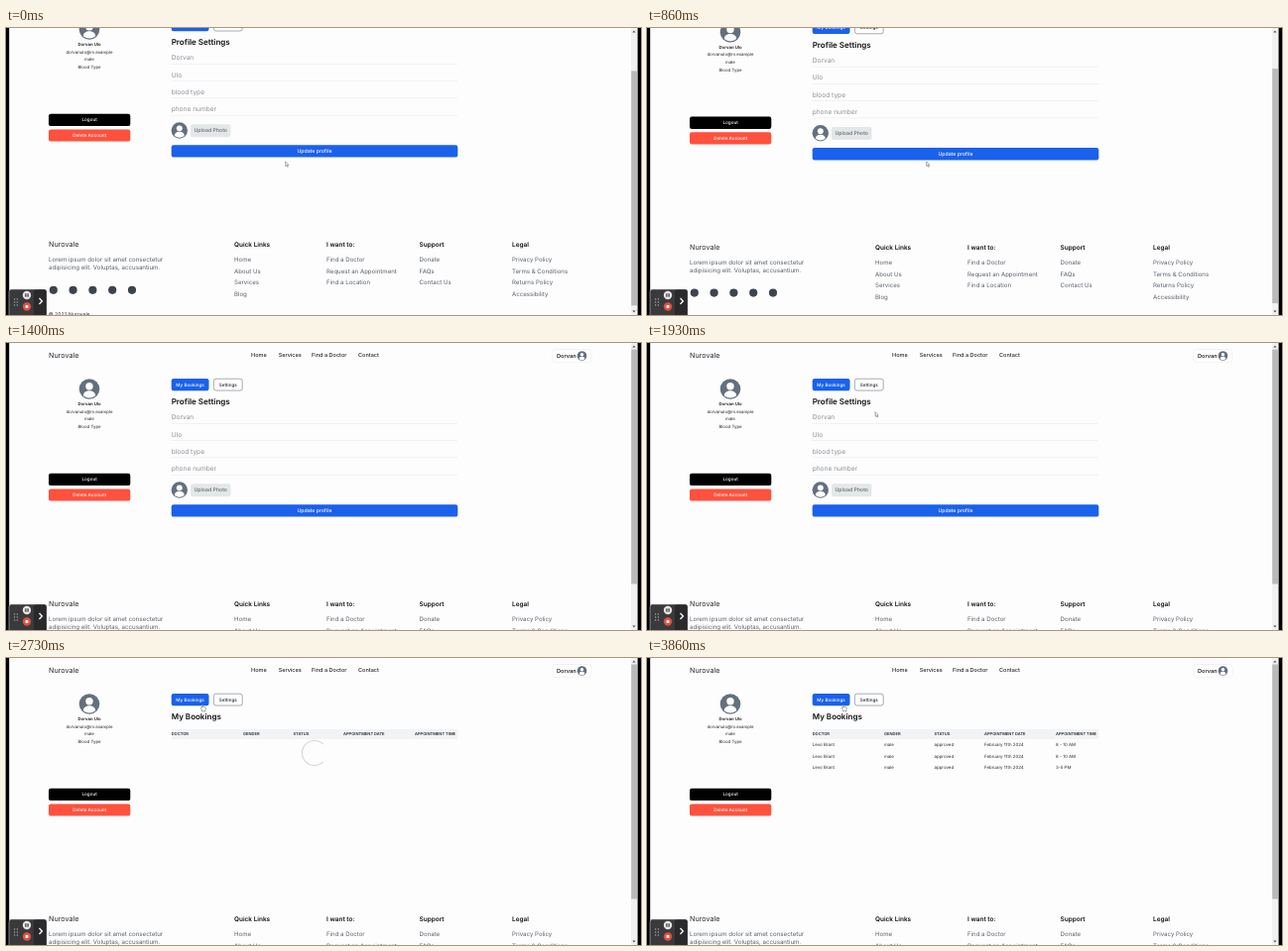
Write an HTML page that moves like this. It is 640 by 290 pixels and loops after 3.93 s.

```html
<!DOCTYPE html>
<html lang="en">
<head>
<meta charset="utf-8">
<title>Patient profile</title>
<style>
  html, body { margin: 0; width: 100%; height: 100%; overflow: hidden; background: #fdfdfd; }
  svg { display: block; width: 640px; height: 290px; }
  text { font-family: Inter, "Open Sans", sans-serif; text-rendering: geometricPrecision; white-space: pre; }
</style>
</head>
<body>
<svg id="stage" viewBox="0 0 640 290"></svg>
<script>
const LOOP = 3930, FRAME = 1000 / 15, MAX_SCROLL = 48;
const BLUE = '#1a61ec', INK = '#24282f', GREY = '#5a616c', FIELD = '#8c9199';

// y is the vertical middle of the capitals
const text = (s, x, y, size, fill = INK, weight = 400, anchor = 'start') =>
  `<text x="${x}" y="${y + size * 0.36}" font-size="${size}" fill="${fill}" font-weight="${weight}" text-anchor="${anchor}">${s}</text>`;
const rect = (x, y, w, h, fill, r = 0, extra = '') =>
  `<rect x="${x}" y="${y}" width="${w}" height="${h}" rx="${r}" fill="${fill}" ${extra}/>`;
const circle = (x, y, r, fill) => `<circle cx="${x}" cy="${y}" r="${r}" fill="${fill}"/>`;
const button = (label, x, y, w, h, size, fill, ink = '#fff', extra = '') =>
  rect(x, y, w, h, fill, 2.2, extra) + text(label, x + w / 2, y + h / 2 - 0.2, size, ink, 500, 'middle');
const avatar = (x, y, r) => `<g transform="translate(${x} ${y}) scale(${r / 10})">
  ${circle(0, 0, 10, '#64707f')}${circle(0, -2.6, 3.6, '#fff')}
  <path d="M-6 6.6C-6 0 6 0 6 6.6Q0 11 -6 6.6Z" fill="#fff"/></g>`;

const header = () =>
  text('Nurovale', 43, 12.3, 7.2) +
  [['Home', 247], ['Services', 274.7], ['Find a Doctor', 308], ['Contact', 355]]
    .map(([s, x]) => text(s, x, 12.2, 5.55, INK, 500)).join('') +
  rect(551, 6.5, 39, 12.8, '#fff', 3, 'stroke="#e9eaec" stroke-width=".6"') +
  text('Dorvan', 555, 12.8, 5.6, INK, 600) + avatar(580.5, 13, 4.8);

const sidebar = () =>
  avatar(84, 46.5, 10.3) +
  text('Dorvan Ulo', 84, 61.2, 4.3, '#111', 600, 'middle') +
  ['dorvanulo@m.example', 'male', 'Blood Type']
    .map((s, i) => text(s, 84, 69 + i * 7.8, 4.35, INK, 400, 'middle')).join('') +
  button('Logout', 43, 131.8, 82.3, 12.3, 4.6, '#000') +
  button('Delete Account', 43, 147.4, 82.3, 12.2, 4.6, '#ff513d');

const tabs = () =>
  button('My Bookings', 166.7, 36, 37.8, 12.2, 4.6, BLUE) +
  button('Settings', 209.4, 36.2, 28.8, 11.8, 4.6, '#fff', INK, 'stroke="#6b7280" stroke-width=".6"');

const settings = () =>
  text('Profile Settings', 166.7, 59.5, 8, '#111', 600) +
  ['Dorvan', 'Ulo', 'blood type', 'phone number'].map((s, i) =>
    text(s, 166.7, 75 + i * 17.3, 6.6, FIELD) + rect(166.7, 81 + i * 17.3, 288.3, 0.5, '#e3e5e8')).join('') +
  avatar(174.8, 148.5, 8.2) +
  button('Upload Photo', 186, 142.2, 40.5, 13, 5.2, '#e4e7e8', '#60656d') +
  button('Update profile', 166.7, 163.2, 288.6, 12.4, 5.15, BLUE);

const COLUMNS = [166.7, 239, 289.5, 340, 412];
const tableRow = (cells, y, size, weight) =>
  cells.map((s, i) => text(s, COLUMNS[i], y, size, INK, weight)).join('');
const bookings = () =>
  text('My Bookings', 166.7, 59.5, 8, '#111', 600) +
  rect(166.7, 72, 288.6, 10.2, '#f2f3f4') +
  tableRow(['DOCTOR', 'GENDER', 'STATUS', 'APPOINTMENT DATE', 'APPOINTMENT TIME'], 77, 4.05, 600) +
  '<path id="spinner" d="M9.8 9.8A13.9 13.9 0 1 1 9.8 -9.8" fill="none" stroke="#d6d6d8" stroke-width="1.2"/>' +
  '<g id="rows">' + ['8 - 10 AM', '8 - 10 AM', '3-5 PM'].map((hours, i) =>
    tableRow(['Levo Brant', 'male', 'approved', 'February 11th 2024', hours], 87.2 + i * 11.75, 4.4, 400)).join('') + '</g>';

const FOOTER = [
  [230, 'Quick Links', 'Home', 'About Us', 'Services', 'Blog'],
  [323, 'I want to:', 'Find a Doctor', 'Request an Appointment', 'Find a Location'],
  [416.6, 'Support', 'Donate', 'FAQs', 'Contact Us'],
  [510, 'Legal', 'Privacy Policy', 'Terms &amp; Conditions', 'Returns Policy', 'Accessibility'],
];
const footer = () =>
  text('Nurovale', 43, 263.5, 7.2) +
  text('Lorem ipsum dolor sit amet consectetur', 43, 279, 6.15, GREY) +
  text('adipisicing elit. Voluptas, accusantium.', 43, 287.1, 6.15, GREY) +
  [0, 1, 2, 3, 4].map(i => circle(47.8 + i * 19.8, 309.8, 4.1, '#3d4450')).join('') +
  text('© 2022 Nurovale', 43, 334.3, 5.1, INK) +
  FOOTER.map(([x, title, ...links]) => text(title, x, 263.6, 6.45, '#111', 600) +
    links.map((s, i) => text(s, x, 279.2 + i * 11.55, 6.1, GREY)).join('')).join('');

const scrollbar = () =>
  rect(630, 0, 7, 290, '#f1f1f1') +
  '<path d="M631.3 4.6L632.9 2.4 634.5 4.6ZM631.3 285.4L632.9 287.6 634.5 285.4Z" fill="#505050"/>' +
  '<rect id="thumb" x="630.2" width="5.7" height="237" fill="#b9b9b9"/>';

const recorder = () =>
  rect(3, 264, 38, 30, '#3a3a3c', 2.5, 'stroke="#c4c4c6" stroke-width=".6"') + rect(28, 264.4, 12.6, 30, '#2a2a2c', 2) +
  [0, 1, 2].map(i => circle(8.6, 274 + i * 3, 0.7, '#aaa') + circle(11.4, 274 + i * 3, 0.7, '#aaa')).join('') +
  circle(21, 270, 4.2, '#e6e6e6') + rect(19.3, 268.3, 1.2, 3.4, '#333') + rect(21.5, 268.3, 1.2, 3.4, '#333') +
  circle(21, 281.5, 4.2, '#e04f3c') + rect(19.6, 280.1, 2.8, 2.8, '#fff') +
  '<path d="M33.5 273L36.4 276 33.5 279" fill="none" stroke="#fff" stroke-width="1.3"/>';

const cursors = () => `<circle id="ring" cx="197.5" cy="47.3" fill="none" stroke="#e2443c" stroke-width="1.1"/>
  <g id="cursor" fill="#fff" stroke="#555" stroke-width=".5" stroke-linejoin="round">
  <path id="arrow" d="M0 0V4.6L1.1 3.7 1.9 5.4 2.6 5.1 1.9 3.4H3.2Z"/>
  <path id="hand" d="M-.4 0V3L-1.3 2.6 -1.8 3.2 -.4 5.6V6.6H2.9V5.6L3.3 3.2 2.8 2.6 .6 2.3V0Z"/></g>`;

document.getElementById('stage').innerHTML =
  rect(0, 0, 640, 290, '#fdfdfd') +
  `<g id="page">${header()}${sidebar()}${tabs()}<g id="settings">${settings()}</g><g id="bookings">${bookings()}</g>${footer()}</g>` +
  scrollbar() + rect(0, 0, 3.2, 290, '#000') + rect(636.6, 0, 3.4, 290, '#000') + recorder() + cursors();

const el = id => document.getElementById(id);
const show = (id, on) => el(id).setAttribute('visibility', on ? 'inherit' : 'hidden');
const move = (id, value) => el(id).setAttribute('transform', value);
const clamp = u => Math.min(1, Math.max(0, u));
const smooth = u => u * u * (3 - 2 * u);

function scrollAt(t) {
  if (t < 700) return MAX_SCROLL - 3 * Math.exp(-t / 60);
  return MAX_SCROLL * (1 - smooth(clamp((t - 806) / 280)));
}

function drawCursor(t) {
  const u = smooth(clamp((t - 1800) / 267));
  const [x, y] = t < 1800 ? [281.7, 135] : [262 - 64 * u, 92 - 44.8 * u];
  const onTab = t > 1800 && u > 0.95;
  const overFields = t > 1130 && y > 74;
  move('cursor', `translate(${x} ${y})`);
  show('arrow', !onTab && !overFields);
  show('hand', onTab);
  show('ring', t > 2330 && t < 2530);
  el('ring').setAttribute('r', t < 2390 ? 9 : 13.3);
}

function draw(now) {
  const t = Math.floor((now % LOOP + 7) / FRAME) * FRAME;
  const scroll = scrollAt(t), booked = t > 2530, loaded = t > 3390;
  move('page', `translate(0 ${-scroll})`);
  el('thumb').setAttribute('y', 6.5 + scroll * 0.82);
  show('settings', !booked);
  show('bookings', booked);
  show('rows', booked && loaded);
  show('spinner', booked && !loaded);

  const turn = (t - 2733) / 750, phase = (turn + 1.75) % 1;
  move('spinner', `translate(311 96) rotate(${turn * 360}) scale(${0.8 + 0.4 * Math.abs(phase - 0.5)})`);
  drawCursor(t);
}

const start = performance.now();
(function tick() {
  draw(performance.now() - start);
  requestAnimationFrame(tick);
})();
</script>
</body>
</html>
```
